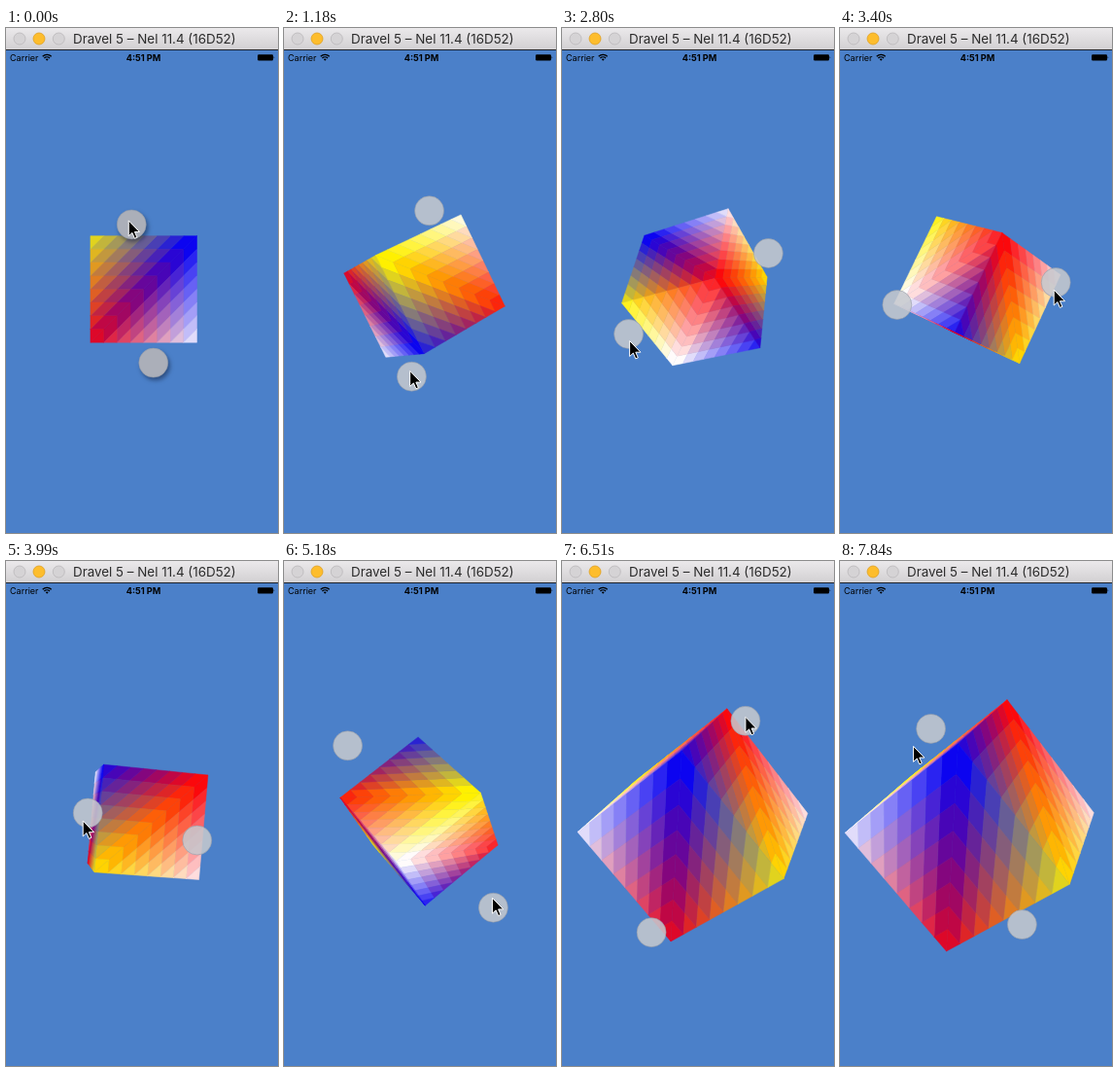
These frames come from a looping animation (280 by 519 pixels, 7990 ms). An HTML page with a canvas:

```html
<!DOCTYPE html>
<html lang="en">
<head>
<meta charset="utf-8">
<title>Cube gestures</title>
<style>
  html, body { margin: 0; width: 280px; height: 519px; overflow: hidden; background: #4b80c9; }
  canvas, svg { position: absolute; left: 0; top: 0; width: 280px; height: 519px; }
  text { font-family: Inter, Roboto, sans-serif; }
  .touch { fill: rgba(197, 200, 206, .87); stroke: rgba(146, 153, 166, .7); stroke-width: .8; }
  .lifted .touch { fill: #abafb9; filter: drop-shadow(2px 3px 2px rgba(15, 30, 60, .5)); }
</style>
</head>
<body>
<canvas id="scene"></canvas>
<svg viewBox="0 0 280 519">
  <defs>
    <linearGradient id="bar" x2="0" y2="1">
      <stop stop-color="#ebe9eb"/><stop offset="1" stop-color="#d2d0d2"/>
    </linearGradient>
  </defs>
  <rect width="280" height="22" fill="url(#bar)"/>
  <rect y="22" width="280" height="1" fill="#1d222b"/>
  <g stroke-width=".8">
    <circle cx="14" cy="11" r="6" fill="#d5d3d5" stroke="#bab8ba"/>
    <circle cx="34" cy="11" r="6" fill="#fdbd2d" stroke="#dfa023"/>
    <circle cx="54.3" cy="11" r="6" fill="#d5d3d5" stroke="#bab8ba"/>
  </g>
  <text x="69" y="16" font-size="13.4" fill="#2b2b2b">Dravel 5 – Nel 11.4 (16D52)</text>
  <text x="4" y="33.6" font-size="9">Carrier</text>
  <text x="141.5" y="33.6" font-size="9.2" font-weight="700" text-anchor="middle">4:51 PM</text>
  <g fill="none" stroke="#000" stroke-width="1.4">
    <path d="M37.7 29.2a6.4 6.4 0 0 1 9 0M39.4 31a4 4 0 0 1 5.6 0"/>
    <path d="M42.2 33.8l-1.4-1.5a2 2 0 0 1 2.8 0z" fill="#000" stroke="none"/>
  </g>
  <rect x="259" y="27.3" width="16" height="6.2" rx="1.2"/>
  <path d="M275.6 29.1q1.4 1.3 0 2.6z"/>

  <g id="touches">
    <circle class="touch" r="15"/>
    <circle class="touch" r="15"/>
  </g>
  <path id="cursor" d="M0 0V16L3.7 12.6 6.2 18.4 8.7 17.3 6.2 11.7H11.3Z" stroke="#fff" stroke-width="1"/>
</svg>

<script>
const LOOP = 7990, STEP = 148;
const FOCAL = 597, DEPTH = 11.9, CELLS = 8;
const CUBE = { x: 141.7, y: 268.4 }, PIVOT = { x: 140.5, y: 273 };
const SWELL = 12;

// pose: vector part of a unit quaternion; tip: cursor offset from its touch
const KEYS = [
  { step: 0, scale: 1, pose: [0, 0, 0], angle: -99, radius: 72, tip: [-3, -4] },
  { step: 13, scale: 1, pose: [.633, -.353, -.624], angle: -367, radius: 76, tip: [-1, -7] },
  { step: 19, scale: 1, pose: [-.445, .096, .645], angle: -570, radius: 83, tip: [1, 7] },
  { step: 27, scale: 1, pose: [-.514, .561, -.478], angle: -886, radius: 58, tip: [-5, 8] },
  { step: 35, scale: 1, pose: [.11, .746, .482], angle: -1032, radius: 112, tip: [-1, -10] },
  { step: 44, scale: 1.425, pose: [-.861, .432, -.046], angle: -1146, radius: 119, tip: [0, -4] },
  { step: 53, scale: 1.54, pose: [-.861, .432, -.046], angle: -1195, radius: 111, tip: [-18, 18] }
];

// Opposite corners share a colour; lower case marks the back four.
const CORNERS = {
  Y: [-1, 1, 1], B: [1, 1, 1], W: [1, -1, 1], R: [-1, -1, 1],
  y: [1, -1, -1], b: [-1, -1, -1], w: [-1, 1, -1], r: [1, 1, -1]
};
const COLORS = { Y: [255, 240, 0], B: [12, 4, 240], W: [255, 251, 251], R: [251, 8, 12] };
// Clockwise from outside; each face is split from its first corner to its third.
const FACES = ['BWRY', 'YwrB', 'wYRb', 'RWyb', 'byrw', 'WBry'];

const canvas = document.getElementById('scene');
const ctx = canvas.getContext('2d');
const touches = document.getElementById('touches');
const cursor = document.getElementById('cursor');
const ratio = window.devicePixelRatio || 1;
canvas.width = 280 * ratio;
canvas.height = 519 * ratio;
ctx.scale(ratio, ratio);
ctx.lineJoin = 'round';
ctx.lineWidth = .5;

const lerp = (a, b, p) => a + (b - a) * p;

function span(step) {
  let i = 0;
  while (i < KEYS.length - 2 && step >= KEYS[i + 1].step) i++;
  const a = KEYS[i], b = KEYS[i + 1];
  return [a, b, (step - a.step) / (b.step - a.step)];
}

function quaternion(v) {
  return [Math.sqrt(Math.max(0, 1 - Math.hypot(...v) ** 2)), ...v];
}

function slerp(a, b, p) {
  let dot = a.reduce((sum, v, i) => sum + v * b[i], 0);
  const sign = dot < 0 ? -1 : 1;
  dot = Math.min(1, dot * sign);
  const angle = Math.acos(dot);
  if (angle < 1e-3) return a;
  const s = Math.sin(angle);
  const ka = Math.sin((1 - p) * angle) / s, kb = sign * Math.sin(p * angle) / s;
  return a.map((v, i) => v * ka + b[i] * kb);
}

function rotate([w, x, y, z], [a, b, c]) {
  const tx = 2 * (y * c - z * b), ty = 2 * (z * a - x * c), tz = 2 * (x * b - y * a);
  return [
    a + w * tx + y * tz - z * ty,
    b + w * ty + z * tx - x * tz,
    c + w * tz + x * ty - y * tx
  ];
}

function project([x, y, z]) {
  const k = FOCAL / (DEPTH - z);
  return [CUBE.x + x * k, CUBE.y - y * k];
}

const blend = (points, weights) =>
  [0, 1, 2].map(i => points.reduce((sum, pt, n) => sum + pt[i] * weights[n], 0));

// Flat cells, each coloured by its vertex nearest the first corner.
function drawHalf(points, colors) {
  const weights = (i, j) => [1 - (i + j) / CELLS, i / CELLS, j / CELLS];
  for (let i = 0; i < CELLS; i++) {
    for (let j = 0; i + j < CELLS; j++) {
      const spots = [[i, j], [i + 1, j], [i + 1, j + 1], [i, j + 1]];
      if (i + j === CELLS - 1) spots.splice(2, 1);
      const color = blend(colors, weights(i, j)).map(Math.round);
      ctx.fillStyle = ctx.strokeStyle = `rgb(${color})`;
      ctx.beginPath();
      spots.forEach(s => ctx.lineTo(...project(blend(points, weights(...s)))));
      ctx.closePath();
      ctx.fill();
      ctx.stroke();
    }
  }
}

function facesViewer(points) {
  const flat = points.map(project);
  return flat.reduce((area, [x, y], i) => {
    const [u, v] = flat[(i + 1) % 4];
    return area + x * v - u * y;
  }, 0) > 0;
}

function drawCube(a, b, p) {
  const turn = slerp(quaternion(a.pose), quaternion(b.pose), p);
  const scale = lerp(a.scale, b.scale, p);
  ctx.clearRect(0, 0, 280, 519);
  for (const face of FACES) {
    const names = [...face];
    const points = names.map(n => rotate(turn, CORNERS[n]).map(v => v * scale));
    if (!facesViewer(points)) continue;
    const colors = names.map(n => COLORS[n.toUpperCase()]);
    for (const half of [[0, 1, 2], [0, 2, 3]]) {
      drawHalf(half.map(i => points[i]), half.map(i => colors[i]));
    }
  }
}

function place(node, x, y) {
  node.setAttribute('transform', `translate(${x.toFixed(2)} ${y.toFixed(2)})`);
}

// Two touches mirrored about the pivot; the cursor drags the first one.
function drawTouches(a, b, p) {
  const angle = lerp(a.angle, b.angle, p) * Math.PI / 180;
  const radius = lerp(a.radius, b.radius, p) + SWELL * Math.sin(Math.PI * p);
  const x = radius * Math.cos(angle), y = radius * Math.sin(angle);
  const [dx, dy] = a.tip.map((v, i) => lerp(v, b.tip[i], p));
  place(touches.children[0], PIVOT.x + x, PIVOT.y + y);
  place(touches.children[1], PIVOT.x - x, PIVOT.y - y);
  place(cursor, PIVOT.x + x + dx, PIVOT.y + y + dy);
}

const start = performance.now();
let shown = -1;

function tick() {
  const time = Math.max(0, performance.now() - start) % LOOP;
  const step = Math.min(53, Math.floor((time + 15) / STEP));
  if (step !== shown) {
    shown = step;
    const [a, b, p] = span(step);
    drawCube(a, b, p);
    drawTouches(a, b, p);
    touches.setAttribute('class', step < 2 ? 'lifted' : '');
  }
  requestAnimationFrame(tick);
}
tick();
</script>
</body>
</html>
```
